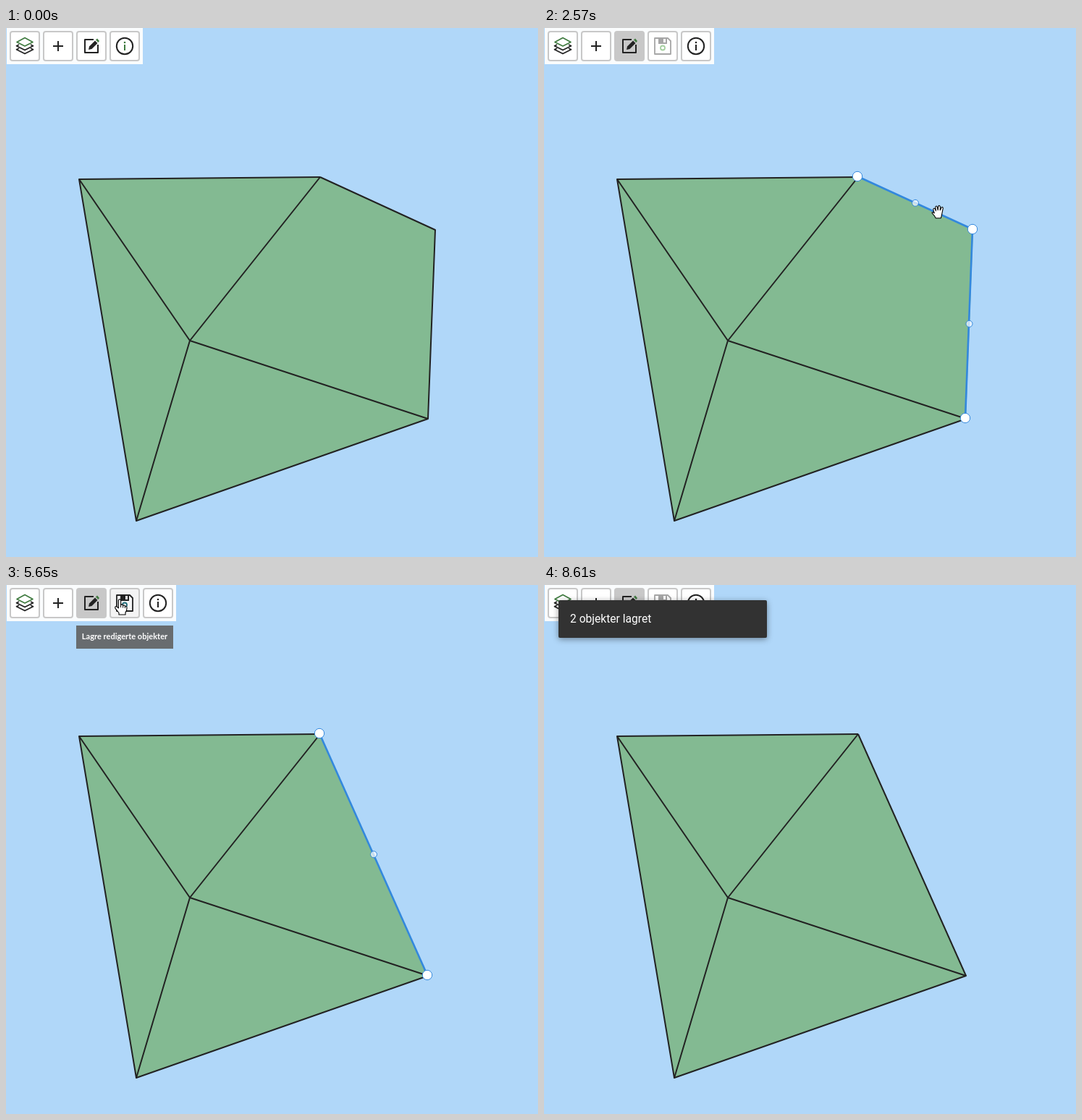
An HTML page with a canvas that plays this animation: 735 px wide and 731 px high, repeating every 9080 ms.

```html
<!DOCTYPE html>
<html lang="no">
<head>
<meta charset="utf-8">
<style>
html, body { margin: 0; width: 100%; height: 100%; overflow: hidden; background: #b0d7f9; }
canvas { display: block; }
</style>
</head>
<body>
<canvas id="stage" width="735" height="731"></canvas>
<script>
const g = document.getElementById('stage').getContext('2d');
const LOOP = 9080, DARK = '#222', GREEN = '#3f7a3f', BLUE = '#3388dd';

// Map corners and inner node
const A = [101, 209], B = [434, 206], C = [593, 279], D = [583, 540], E = [180, 681], M = [254, 432];

const POINTER = new Path2D('M-1.6 .8Q0-1.2 1.6 .8V7.5Q3.8 6 4.6 8.3Q6.8 7.2 7.4 9.3Q10 8.6 10 12Q10 16 8 18V21H-1V18.5L-6 12.3Q-7 9.3-4 9.7L-1.6 12Z');
const FINGERS = new Path2D('M1.6 7.5V11M4.6 8.3V11.5M7.4 9.3V12');
const HAND = new Path2D('M-5 2L-6.5-3Q-6-5.5-4-4L-2.8-1L-3.5-6.5Q-2-9-1-6.5L0-2L.5-7.5Q2-9.5 3.2-7L3-2L5-6Q7-7 7-4.5L5.5 3Q5 6 4 9H-3Q-4 6-8 2Q-8.5-.5-5 2Z');
const ARROW = new Path2D('M0 0V16L4 12.5L6.5 18L9 17L6.5 11.5H11.5Z');

// Cursor moves: start, end, from, bend, to
const MOVES = [
  [260, 1020, [705, 701], [430, 240], [117, 16]],
  [1360, 1680, [117, 16], [300, 100], [505, 220]],
  [1680, 2040, [505, 220], [522, 230], [516, 243]],
  [2380, 2930, [516, 243], [570, 262], [601, 284]],
  [2930, 3130, [601, 284], [598, 286], [593, 284]],
  [3200, 3270, [593, 284], [592, 281], [590, 279]],
  [4000, 4410, [590, 279], [588, 268], [583, 258]],
  [4690, 5580, [583, 258], [350, 120], [157, 20]],
  [7670, 8560, [157, 20], [600, 200], [696, 725]]
];
const CLICKS = [[1220, 1360], [2240, 2380], [3600, 3740], [5920, 6060]];

const within = (t, a, b) => t >= a && t < b;
const clamp = v => Math.max(0, Math.min(1, v));
const smooth = u => u * u * (3 - 2 * u);

function stroke(path, color = DARK, width = 2) {
  g.strokeStyle = color;
  g.lineWidth = width;
  g.stroke(typeof path === 'string' ? new Path2D(path) : path);
}
function fill(path, color) {
  g.fillStyle = color;
  g.fill(typeof path === 'string' ? new Path2D(path) : path);
}
function poly(pts, closed) {
  const p = new Path2D();
  pts.forEach(q => p.lineTo(...q));
  if (closed) p.closePath();
  return p;
}
function disc(x, y, r) {
  const p = new Path2D();
  p.arc(x, y, r, 0, Math.PI * 2);
  return p;
}
function box(x, y, w, h, r) {
  const p = new Path2D();
  p.roundRect(x, y, w, h, r);
  return p;
}
function text(s, x, y, font, align = 'left') {
  g.font = font;
  g.textAlign = align;
  g.fillStyle = '#fff';
  g.fillText(s, x, y);
}

function drawMap(t) {
  const selected = within(t, 1960, 6130), handles = within(t, 2310, 6130);
  const edge = t < 3670 ? [B, C, D] : [B, D];
  fill(poly(t < 4000 ? [A, B, C, D, E] : [A, B, D, E], true), '#83ba92');
  stroke(poly([B, A, E, D, M, A]));
  stroke(poly([B, M, E]));
  if (!selected) return stroke(poly(edge));

  const pts = edge.map(([x, y]) => [x - 1, y - 1]);
  stroke(poly(pts), BLUE, 2.6);
  if (!handles) return;
  pts.forEach(([x, y], i) => {
    if (i) {
      const mid = disc((x + pts[i - 1][0]) / 2 + .5, (y + pts[i - 1][1]) / 2 + .3, 4.5);
      fill(mid, 'rgba(255,255,255,.7)');
      stroke(mid, BLUE, 1);
    }
  });
  pts.forEach(([x, y]) => {
    const dot = disc(x, y, 6.7);
    fill(dot, '#fff');
    stroke(dot, BLUE, 1);
  });
}

// Icons are drawn around their centre
const icons = {
  layers() {
    stroke('M-11-5.5L0-11.5L11-5.5L0 0Z', GREEN, 1.6);
    for (const y of [0, 5]) stroke(`M-8 ${y - 2}L-11.5 ${y - .3}L0 ${y + 5.5}L11.5 ${y - .3}L8 ${y - 2}`, DARK, 1.8);
  },
  plus() { stroke('M-7 0H7M0-7V7'); },
  edit() {
    stroke('M3-9H-9V9H9V-2');
    fill('M-4 5L-3 .5L5-7.5L8.5-4L.5 4Z', DARK);
    fill('M6-8.5L8-10.5L11-7L9.3-5Z', GREEN);
  },
  save(on) {
    const c = on ? DARK : '#a6a6a6';
    stroke('M-11-11H7L11-7V11H-11Z', c, 1.8);
    fill('M-6-12H6V-3H-6ZM1-10V-5H4V-10Z', c);
    stroke(disc(0, 2.5, 3), on ? '#1f6b78' : '#a5cfa0', 1.8);
  },
  spinner(t) {
    g.rotate(t / 2000 * Math.PI * 2);
    g.setLineDash([4.2, 2.4]);
    stroke(disc(0, 0, 10.5), DARK, 2.8);
    g.setLineDash([]);
  },
  info(color) {
    stroke(disc(0, 0, 11.2), DARK, 2);
    stroke('M0-2V6', color, 2);
    fill(disc(0, -5, 1.3), color);
  }
};

function drawToolbar(t) {
  const editing = t >= 1290;
  const saveIcon = within(t, 5990, 7330) ? ['spinner', t] : ['save', within(t, 4000, 5990)];
  const list = [['layers'], ['plus'], ['edit']];
  if (editing) list.push(saveIcon);
  list.push(['info', editing ? DARK : GREEN]);

  g.fillStyle = '#fafcfd';
  g.fillRect(1, 0, list.length * 46 + 4, 50);
  list.forEach(([name, arg], i) => {
    const x = 5 + i * 46, b = box(x + 1, 5, 40, 40, 3);
    const hover = name === 'edit' ? within(t, 1000, 1400) : i === 3 && within(t, 5560, 7330);
    fill(b, name === 'edit' && editing ? '#c8c8c8' : hover ? '#f4f4f4' : '#fff');
    stroke(b, '#c8c8c8', 2);
    g.save();
    g.translate(x + 21, 25);
    icons[name](arg);
    g.restore();
  });
}

function tooltip(s, cx, w) {
  g.fillStyle = 'rgba(97,97,97,.9)';
  g.fillRect(cx - w / 2, 56, w, 32);
  text(s, cx, 75, 'bold 11.05px Lato, sans-serif', 'center');
}

function snackbar(t) {
  const u = 1 - (1 - clamp((t - 7740) / 150)) ** 3;
  if (!u) return;
  g.save();
  g.globalAlpha = u;
  g.translate(164, 47);
  g.scale(.8 + .2 * u, .8 + .2 * u);
  g.translate(-164, -47);
  g.shadowColor = 'rgba(0,0,0,.4)';
  g.shadowBlur = 8;
  g.shadowOffsetY = 2;
  fill(box(20, 21, 288, 52, 2), '#323232');
  g.shadowColor = 'transparent';
  text('2 objekter lagret', 36, 52, '15.6px Roboto, sans-serif');
  g.restore();
}

function cursorAt(t) {
  const [start, end, p, q, r] = MOVES.filter(m => m[0] <= t).pop();
  const u = smooth(clamp((t - start) / (end - start))), v = 1 - u;
  return p.map((a, i) => v * v * a + 2 * u * v * q[i] + u * u * r[i]);
}

function drawCursor(t) {
  if (!within(t, 260, 8610)) return;
  const [x, y] = cursorAt(t);
  const arrow = t >= 7470 && y < 50;
  const point = y < 50 || within(t, 1960, 2520) || within(t, 3130, 3740);
  g.save();
  g.translate(x, y);
  if (CLICKS.some(c => within(t, ...c))) fill(disc(0, 0, 12), 'rgba(235,40,50,.65)');
  const shape = arrow ? ARROW : point ? POINTER : HAND;
  fill(shape, '#fff');
  stroke(shape, '#000', 1.1);
  if (shape === POINTER) stroke(FINGERS, '#000', 1);
  g.restore();
}

function draw(t) {
  g.fillStyle = '#b0d7f9';
  g.fillRect(0, 0, 735, 731);
  g.lineJoin = 'round';
  drawMap(t);
  drawToolbar(t);
  if (within(t, 1220, 1430)) tooltip('Rediger objekt', 118, 88);
  if (within(t, 5650, 7740)) tooltip('Lagre redigerte objekter', 164, 134);
  snackbar(t);
  drawCursor(t);
}

const begin = performance.now();
function tick() {
  draw((performance.now() - begin) % LOOP);
  requestAnimationFrame(tick);
}
tick();
</script>
</body>
</html>
```
